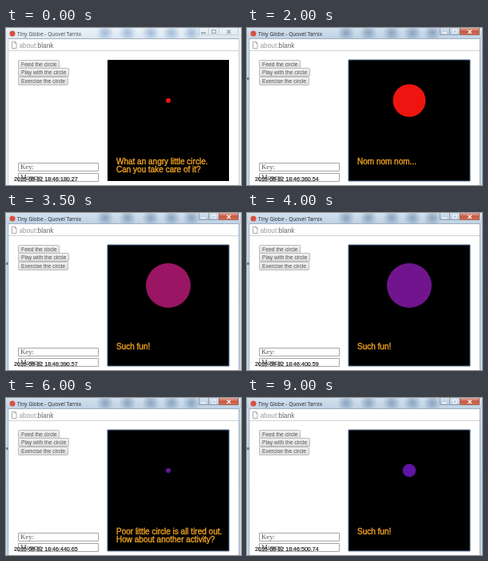
An HTML page with a canvas for the animation above (9.5 s loop, 294 px wide and 197 px high).

```html
<!DOCTYPE html>
<html lang="en">
<head>
<meta charset="utf-8">
<title>Tiny Globe</title>
<style>
html, body { margin: 0; width: 100%; height: 100%; overflow: hidden; background: #fff; }
canvas { display: block; width: 294px; height: 197px; }
</style>
</head>
<body>
<canvas id="stage"></canvas>
<script>
const W = 294, H = 197, STEP = 500, STEPS = 19;
const SANS = '"Liberation Sans", Arial, sans-serif';
const SERIF = '"Liberation Serif", "Times New Roman", serif';
const TITLE = '"Open Sans", "Noto Sans", sans-serif';
const canvas = document.getElementById('stage');
const ctx = canvas.getContext('2d');
const dpr = window.devicePixelRatio || 1;
canvas.width = Math.round(W * dpr);
canvas.height = Math.round(H * dpr);
ctx.scale(dpr, dpr);

// [first step, message lines]
const MESSAGES = [
  [0, ['What an angry little circle.', 'Can you take care of it?']],
  [2, ['Nom nom nom...']],
  [5, ['Such fun!']],
  [9, ['Working up a sweat...']],
  [12, ['Poor little circle is all tired out.', 'How about another activity?']],
  [15, ['Nom nom nom...']],
  [17, ['Such fun!']]
];
// [step, value]
const RADIUS = [[0, 3], [1, 3], [2, 5.5], [5, 28], [8, 28], [10, 13], [11, 5.5], [12, 3], [14, 3], [17, 8.3], [18, 8.3]];
const RED = [[0, 240], [2, 255], [4, 238], [5, 236], [7, 154], [8, 112], [10, 105], [16, 98], [18, 94]];
const BLUE = [[0, 18], [2, 8], [5, 20], [7, 100], [8, 142], [10, 150], [14, 142], [18, 163]];
const HUNDREDTHS = [[1, 49], [2, 51], [5, 56], [7, 57], [10, 62], [14, 67], [18, 74]];

function at(points, n) {
  let a = points[0];
  for (const b of points) {
    if (n <= b[0]) return b === a ? a[1] : a[1] + (b[1] - a[1]) * (n - a[0]) / (b[0] - a[0]);
    a = b;
  }
  return a[1];
}

function rect(x, y, w, h, fill) {
  ctx.fillStyle = fill;
  ctx.fillRect(x, y, w, h);
}

function outline(x, y, w, h, color, radius = 0) {
  ctx.strokeStyle = color;
  ctx.lineWidth = 1;
  ctx.beginPath();
  ctx.roundRect(x + .5, y + .5, w - 1, h - 1, radius);
  ctx.stroke();
}

function disc(x, y, r, fill) {
  ctx.fillStyle = fill;
  ctx.beginPath();
  ctx.arc(x, y, r, 0, Math.PI * 2);
  ctx.fill();
}

function label(str, x, y, size, color, family = SANS, weight = 0) {
  ctx.font = size + 'px ' + family;
  ctx.fillStyle = color;
  ctx.fillText(str, x, y);
  if (weight) {
    ctx.strokeStyle = color;
    ctx.lineWidth = weight;
    ctx.strokeText(str, x, y);
  }
}

function vertical(y0, y1, ...colors) {
  const g = ctx.createLinearGradient(0, y0, 0, y1);
  colors.forEach((c, i) => g.addColorStop(i / (colors.length - 1), c));
  return g;
}

function smudge(x, y, r, color) {
  const g = ctx.createRadialGradient(x, y, 0, x, y, r);
  g.addColorStop(0, `rgba(${color},.65)`);
  g.addColorStop(.4, `rgba(${color},.4)`);
  g.addColorStop(1, `rgba(${color},0)`);
  rect(x - r, 0, r * 2, 13, g);
}

function windowButtons(active) {
  const glyph = active ? '#f4f8fc' : '#8f9aa5';
  const edge = active ? '#8ca0b4' : '#c3ced8';
  if (active) {
    rect(241, 0, 25, 9, vertical(0, 9, '#d5e1ed', '#b4c6d8'));
    rect(266, 0, 25, 9, vertical(0, 9, '#dfa99d', '#c9573f', '#d4765c'));
  }
  outline(241, -2, 13, 11, edge);
  outline(253, -2, 14, 11, edge);
  outline(266, -2, 25, 11, active ? '#a0675f' : edge);
  rect(244, 5.5, 6, 1.5, glyph);
  outline(257, 2, 6, 5, glyph);
  ctx.strokeStyle = glyph;
  ctx.lineWidth = 1.2;
  ctx.beginPath();
  ctx.moveTo(276.5, 2.5); ctx.lineTo(281, 7);
  ctx.moveTo(281, 2.5); ctx.lineTo(276.5, 7);
  ctx.stroke();
}

function drawWindow(active) {
  rect(0, 0, W, H, active ? vertical(0, H, '#cfdfee', '#c3d7ea', '#c6d9eb') : '#e9f0f6');
  rect(0, 0, W, 13, active ? vertical(0, 13, '#d3e1ee', '#bfd2e5') : vertical(0, 13, '#eaf2f8', '#dbe7f1'));
  const blur = active ? '104,134,168' : '126,160,200';
  for (const x of [124, 152, 181, 207, 232]) smudge(x, 6, 11, blur);
  if (active) rect(0, 62, 3, 3, '#6f8396');
  rect(3, 13, 288, H - 13, '#fff');
  rect(3, 13, 288, 1, '#a3afbb');
  rect(3, 28, 288, 1, '#cfd2d5');
  const edge = active ? '#8a9aaa' : '#b5c0ca';
  rect(2.5, 13, .7, H - 13, edge);
  rect(291, 13, .7, H - 13, edge);
  disc(8, 7, 3.5, '#d9503f');
  label('Tiny Globe - Quovel Tarnix', 14, 9.5, 6.6, active ? '#222' : '#444', TITLE);
  windowButtons(active);

  ctx.fillStyle = '#fff';
  ctx.strokeStyle = '#a2a2a2';
  ctx.lineWidth = .9;
  ctx.beginPath();
  ctx.moveTo(7.5, 17); ctx.lineTo(11, 17); ctx.lineTo(13, 19);
  ctx.lineTo(13, 25.5); ctx.lineTo(7.5, 25.5); ctx.closePath();
  ctx.moveTo(11, 17); ctx.lineTo(11, 19); ctx.lineTo(13, 19);
  ctx.fill();
  ctx.stroke();
  label('about:', 16.5, 24.5, 8.3, '#999');
  const x = 16.5 + ctx.measureText('about:').width;
  label('blank', x, 24.5, 8.3, '#666');
}

function button(str, y, w) {
  rect(15, y, w, 10.5, vertical(y, y + 10, '#f3f3f3', '#dedede'));
  outline(15, y, w, 11, '#bcbcbc', 1);
  label(str, 19, y + 7.8, 6.8, '#555');
}

function field(str, y) {
  rect(15, y, 101, 11, '#fff');
  outline(15, y, 101, 11, '#a6a6a6');
  label(str, 18, y + 8, 8.7, '#555', SERIF);
}

function drawPet(n) {
  rect(127, 40, 152, 152, '#000');
  if (n > 0) outline(126.5, 39.5, 153, 153, '#48688c');
  const color = `rgb(${Math.round(at(RED, n))},21,${Math.round(at(BLUE, n))})`;
  disc(203, 91, at(RADIUS, n), color);
  if (n >= 9 && n <= 11) {
    const rise = (n - 10) * 4;
    for (const [x, y] of [[193.5, 60], [210.5, 60], [201.5, 68]]) disc(x, y - rise, 1.3, color);
    disc(131.5, 44, .7, '#30104a');
  }
  const lines = MESSAGES.filter(m => m[0] <= n).pop()[1];
  lines.forEach((s, i) => label(s, 138, 171 + i * 10, 10, '#f2a422', SANS, .35));
}

function clock(n) {
  const time = n ? (32 + n) + '0.' + Math.round(at(HUNDREDTHS, n)) : '180.27';
  label('2016-08-02 18:46:' + time, 10, 191.5, 7.1, '#111', SANS, .15);
}

function frame(now) {
  const n = Math.floor(now / STEP) % STEPS;
  drawWindow(n > 0);
  button('Feed the circle', 40, 52);
  button('Play with the circle', 50, 64);
  button('Exercise the circle', 61, 63);
  field('Key:', 169);
  field('Money:', 182);
  drawPet(n);
  clock(n);
}

let start = null;
function loop(now) {
  if (start === null) start = now;
  frame(now - start);
  requestAnimationFrame(loop);
}
frame(0);
requestAnimationFrame(loop);
</script>
</body>
</html>
```
